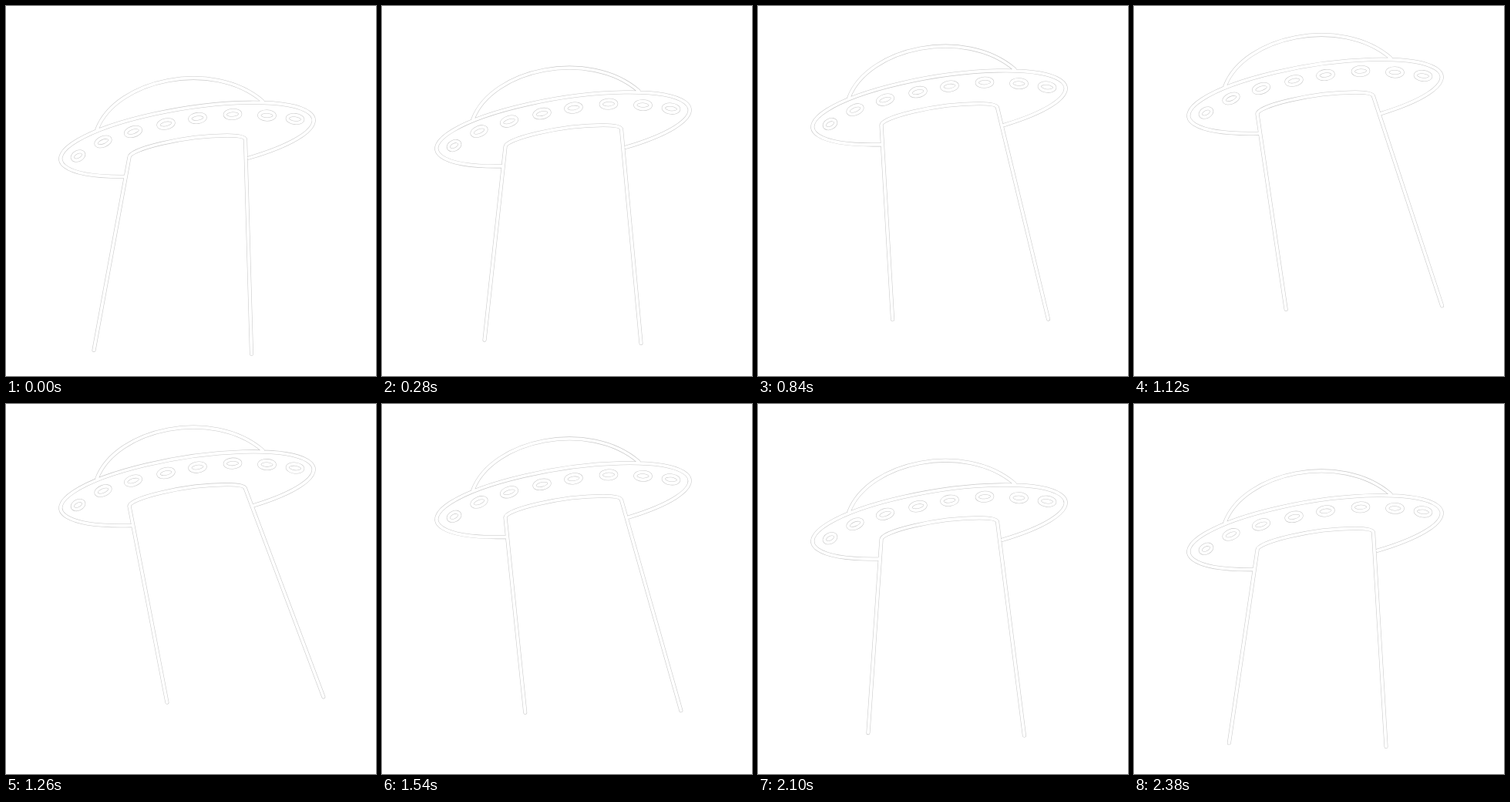
Animation of 480 by 480 pixels, one loop 2520 ms. Source, as an HTML page with a canvas:

```html
<!DOCTYPE html>
<html lang="en">
<head>
<meta charset="utf-8">
<title>Flying saucer</title>
<style>
html, body { margin: 0; width: 100%; height: 100%; overflow: hidden; background: #fff; }
canvas { display: block; }
</style>
</head>
<body>
<canvas id="stage" width="480" height="480"></canvas>
<script>
const ctx = document.getElementById('stage').getContext('2d');
const STEP = 140, COUNT = 18;

const body = new Path2D(
  'M118 160 C143 95 268 68 333 123.5 ' +                       // dome
  'M160 196 C160 186 230 168 287 168 Q309 168 310.5 173');     // rim of the beam

const windows = [[93.5, 194.5], [126, 176], [165, 163], [207.5, 153],
  [248.5, 145.5], [294, 140.5], [338.5, 142], [375, 146.5]];
windows.forEach(([x, y], i) => {
  const hole = new Path2D();
  const tilt = (4.6 * i - 26) * Math.PI / 180;
  hole.ellipse(x, y, Math.min(9.8, 7.7 + 1.8 * i), 5, tilt, 0, 2 * Math.PI);
  body.addPath(hole);
});

// The saucer rises and the beam swings, both slightly faster towards the top
function saucer(p, lift) {
  const path = new Path2D(body);
  path.moveTo(160, 196);
  path.lineTo(114 + 9.2 * p + 0.15 * p * p, 446.5 - 6.6 * p + lift);
  path.moveTo(310.5, 173);
  path.lineTo(318.5 + 8.3 * p + 0.23 * p * p, 451.5 - 6.7 * p - 0.14 * p * p + lift);

  // The hull stays open between the two sides of the beam
  const hull = new Path2D();
  hull.ellipse(235, 173.3, 166.2, 40.6, -0.16, 2.13 - 0.007 * p, 1.1 - 0.005 * p + 2 * Math.PI);
  path.addPath(hull);
  return path;
}

function draw() {
  const k = Math.floor(performance.now() / STEP) % COUNT;
  const p = Math.min(k, COUNT - k);
  const lift = 6.6 * p + 0.05 * p * p;
  const path = saucer(p, lift);
  ctx.setTransform(1, 0, 0, 1, 0, 0);
  ctx.fillStyle = '#fff';
  ctx.fillRect(0, 0, 480, 480);
  ctx.translate(0, -lift);
  ctx.lineCap = ctx.lineJoin = 'round';
  for (const [width, color] of [[4.9, '#c8c8c8'], [3.8, '#fff']]) {
    ctx.lineWidth = width;
    ctx.strokeStyle = color;
    ctx.stroke(path);
  }
  requestAnimationFrame(draw);
}
draw();
</script>
</body>
</html>
```
